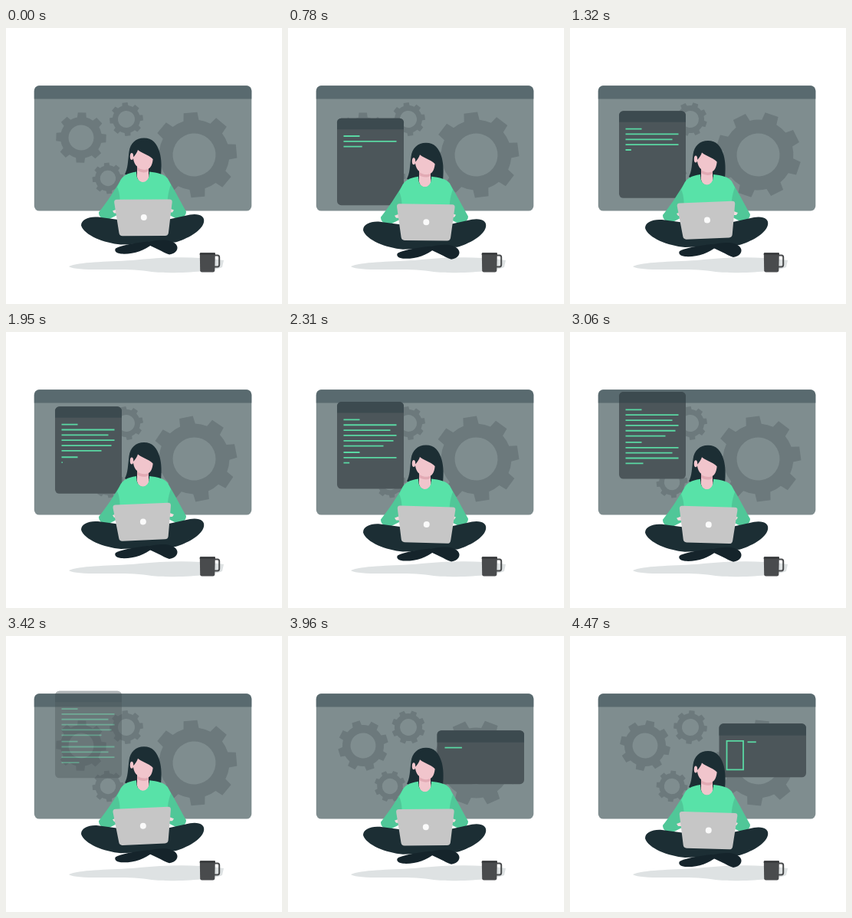
Write an HTML page that moves like this. It is 360 px wide and 360 px high and loops after 4.5 s.

```html
<!DOCTYPE html>
<html lang="en">
<head>
<meta charset="utf-8">
<title>Coding</title>
<style>
  html, body { margin: 0; width: 100%; height: 100%; overflow: hidden; background: #fff; }
  svg { display: block; width: 100%; height: 100%; }
  .code { fill: none; stroke: #5ad8a3; stroke-width: 1.8; }
  .dark { fill: #1c2e34; }
  .shoe { fill: #15242b; }
  .skin { fill: #f1c5cc; }
  .sleeve { fill: #50c798; }
</style>
</head>
<body>
<svg viewBox="0 0 360 360">
  <path fill="#dee2e3" d="M82 311C95 305 130 305 165 303C200 299 245 297 284 303L282 312C270 318 215 321 190 318C170 314 140 315 115 315C95 315 84 313 82 311Z"/>

  <rect x="36.8" y="75.300" width="283.500" height="163.300" rx="6.5" fill="#7f8d8f"/>
  <path fill="#596a6f" d="M36.800 92.500V81.800A6.500 6.500 0 0 1 43.300 75.300H313.800A6.500 6.500 0 0 1 320.300 81.800V92.500Z"/>
  <g id="gears" fill="#6c797c" fill-rule="evenodd"></g>

  <g id="editor">
    <rect x="64" width="87" height="113.5" rx="5.5" fill="#4c565a"/>
    <path fill="#3c4a4f" d="M64 14.5V5.5A5.5 5.5 0 0 1 69.5 0H145.5A5.5 5.5 0 0 1 151 5.5V14.5Z"/>
    <path id="lines" class="code"/>
  </g>

  <g id="preview">
    <rect x="194.5" width="113.5" height="70" rx="5.5" fill="#4c565a"/>
    <path fill="#3c4a4f" d="M194.5 15.5V5.5A5.5 5.5 0 0 1 200 0H302.5A5.5 5.5 0 0 1 308 5.5V15.5Z"/>
    <path id="box" class="code" stroke-dasharray="118 400" d="M204.5 22.5H226V60H204.5Z"/>
    <path id="label" class="code"/>
  </g>

  <g id="person">
    <path class="dark" d="M180 150C169 150 162 157 160.500 168C159 180 159 190 155 197L168 204H196L202 200C203 188 203 178 200.500 169C197 157 191 150 180 150Z"/>
    <path class="skin" d="M166 168C169 163 174 160 180 161L192 171C192 181 190 188 186 190V196C190 212 168 212 171 195V187C167 184 165 177 166 168Z"/>
    <path fill="#e2aab4" d="M171 188C176 192 182 192 186 190V193C181 196 175 195 171 192Z"/>
    <path class="dark" d="M165 176C169 172 171 169 172 165.500C179 171 188 172 195 181C199 170 194 157 183 154C172 152 162 164 165 176Z"/>
    <ellipse class="skin" cx="164" cy="174" rx="2.200" ry="4.500"/>
    <path class="sleeve" d="M150 204C142 218 130 236 121 247C121 253 126 257 134 256L152 247L156 212Z"/>
    <path class="sleeve" d="M210 202C218 214 226 230 235 246C235 252 229 256 222 255L206 247L203 212Z"/>
    <path fill="#58e2a8" d="M170 194C158 196 152 199 149 206L145 214C149 222 149 232 148 242H211C210 232 211 222 215 211L211 203C207 197 197 195 187 194C188 212 169 212 170 194Z"/>
    <path class="dark" d="M98 264C98 256 108 252 120 253L150 257H208L240 250C252 248 260 252 258 260C255 272 235 282 221 286L150 289C128 287 102 277 98 264Z"/>
    <path class="shoe" d="M143 294C150 290 166 287 185 285L191 288C181 297 165 302 150 301C143 300 141 297 143 294Z"/>
    <path class="shoe" d="M184 286C199 282 216 281 222 289C226 294 222 301 213 302C204 299 194 292 184 289Z"/>
    <path fill="#f3dcdf" d="M139 245L147 242V248L141 248ZM219 244L211 241V247L217 247Z"/>
    <g id="laptop">
      <path fill="#c6c6c6" d="M145 230H213.500Q217.500 230 217 234L212 273.500Q211.500 277.500 207.500 277.500H152Q148 277.500 147.500 273.500L141.500 234Q141 230 145 230Z"/>
      <circle cx="180" cy="253.500" r="4" fill="#fafafa"/>
    </g>
  </g>

  <path fill="none" stroke="#494b4d" stroke-width="2" d="M271 296.500H276Q278.200 296.500 278.200 299V308.500Q278.200 311.500 276 311.500H271"/>
  <path fill="#494b4d" d="M252.800 294Q253 293.300 254 293.300H272Q272.800 293.300 272.800 294L272.300 316.500Q272 318.600 270 318.600H255.500Q253.400 318.600 253.200 316.500Z"/>
  <path fill="#393b3d" d="M252.800 294Q253 293.300 254 293.300H272Q272.800 293.300 272.800 294V296H252.800Z"/>
</svg>
<script>
const LOOP = 4500;
const RISE = 0.0174;   // px per ms
const TYPE = 0.2095;   // px per ms
const SPIN = -360 / 3040; // degrees per ms
const $ = id => document.getElementById(id);
const ramp = (t, a, b) => Math.max(0, Math.min(1, (t - a) / (b - a)));
const wave = (t, period) => 2 * Math.PI * t / period;

// A gear around the origin with eight teeth and a round hole
function gearPath(tip) {
  const body = tip * 0.82, hole = tip * 0.5;
  const at = (r, a) => `${(r * Math.sin(a)).toFixed(2)} ${(-r * Math.cos(a)).toFixed(2)}`;
  const arc = `A${body} ${body} 0 0 1 `;
  let d = "";
  for (let i = 0; i < 8; i++) {
    const a = i * Math.PI / 4;
    d += (i ? arc : "M") + at(body, a - 0.22);
    d += `L${at(tip, a - 0.16)}L${at(tip, a + 0.16)}L${at(body, a + 0.22)}`;
  }
  d += `${arc}${at(body, -0.22)}Z`;
  return d + `M${hole} 0A${hole} ${hole} 0 1 0 ${-hole} 0A${hole} ${hole} 0 1 0 ${hole} 0Z`;
}

function addGear(x, y, tip, angle) {
  const el = document.createElementNS("http://www.w3.org/2000/svg", "path");
  el.setAttribute("d", gearPath(tip));
  $("gears").append(el);
  return t => el.setAttribute("transform", `translate(${x} ${y}) rotate(${angle + t * SPIN})`);
}

const turnGear = [
  addGear(98, 143, 33, 2),
  addGear(157, 119, 22, -5),
  addGear(133, 196, 20.5, -5),
  addGear(245.5, 165.5, 56, -5)
];

function show(id, y, alpha) {
  $(id).setAttribute("transform", `translate(0 ${y.toFixed(2)})`);
  $(id).setAttribute("opacity", alpha.toFixed(3));
}

// Six line widths repeat as paragraphs
const widths = [21, 69, 61, 69, 65, 52];

function typed(ink) {
  let d = "";
  for (let i = 0; ink > 0; i++) {
    const w = widths[i % 6];
    const y = 23.3 + i * 6.85 + Math.floor(i / 6) * 1.5;
    d += `M72.5 ${y.toFixed(2)}h${Math.min(w, ink).toFixed(1)}`;
    ink -= w;
  }
  return d;
}

function draw(t) {
  turnGear.forEach(turn => turn(t));

  show("editor", 131.3 - t * RISE, ramp(t, 60, 300) * (1 - ramp(t, 3240, 3540)));
  $("lines").setAttribute("d", typed(Math.min(580, (t - 236) * TYPE)));

  show("preview", 114.3 + (4470 - t) * RISE, ramp(t, 3650, 3900));
  const ink = Math.max(0, (t - 3854) * TYPE);
  $("box").setAttribute("stroke-dashoffset", Math.max(0, 118 - ink));
  $("label").setAttribute("d", ink > 118 ? `M231.5 24h${ink - 118}` : "");

  const bob = -3.2 * (1 + Math.cos(wave(t, 1800)));
  const tilt = 2.1 * Math.sin(wave(t, 720)) - 0.4;
  $("person").setAttribute("transform", `translate(0 ${bob.toFixed(2)})`);
  $("laptop").setAttribute("transform", `rotate(${tilt.toFixed(2)} 179.5 280)`);
}

const start = performance.now();
function tick() {
  draw((performance.now() - start) % LOOP);
  requestAnimationFrame(tick);
}
draw(0);
requestAnimationFrame(tick);
</script>
</body>
</html>
```
